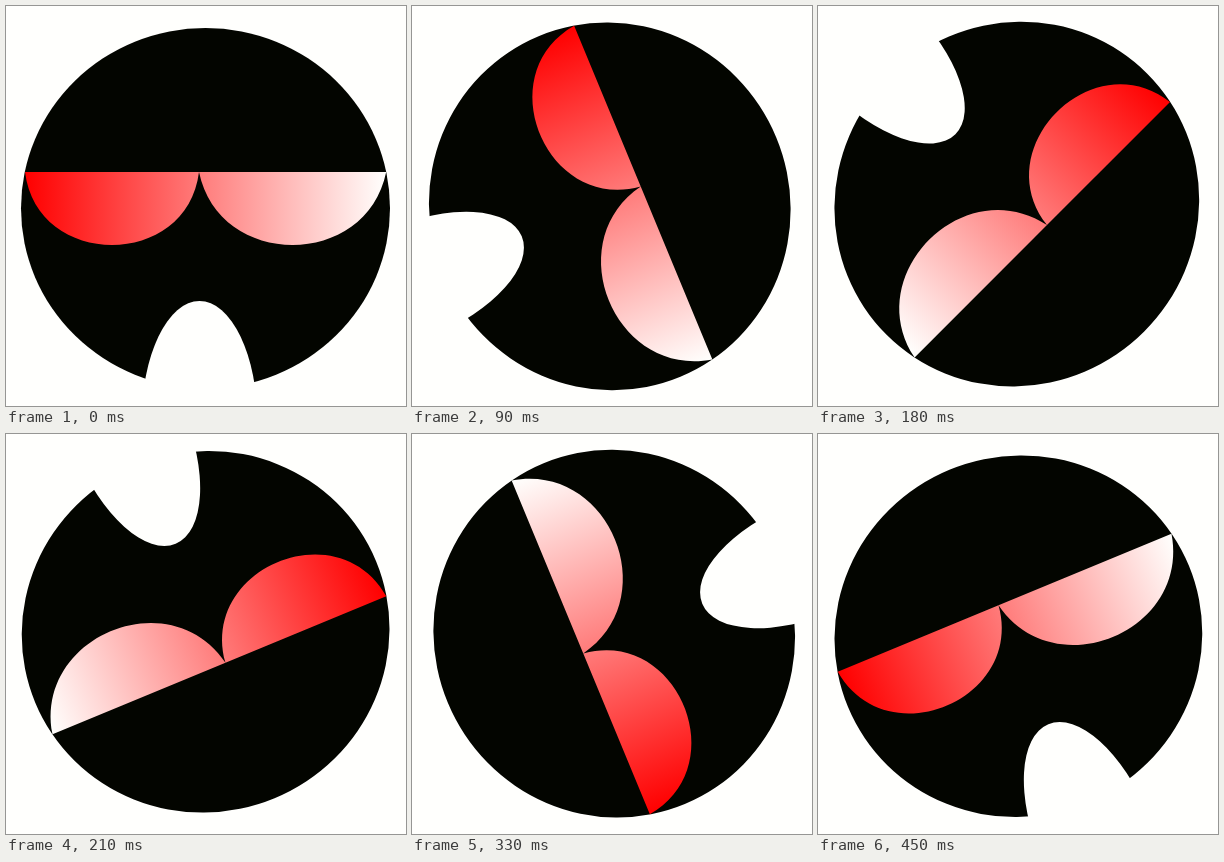
An HTML page that plays this animation: 400x400 px, repeating every 480 ms.

```html
<!DOCTYPE html>
<html lang="en">
<head>
<meta charset="utf-8">
<title>Spinning face</title>
<style>
  html, body { margin: 0; width: 100%; height: 100%; overflow: hidden; background: #fffffd; }
  svg { display: block; width: 100vw; height: 100vh; }
</style>
</head>
<body>
<svg viewBox="0 0 400 400">
  <defs>
    <linearGradient id="fade" gradientUnits="userSpaceOnUse" x1="19" y1="0" x2="380" y2="0">
      <stop offset="0" stop-color="#f00"/>
      <stop offset="1" stop-color="#fffffd"/>
    </linearGradient>
  </defs>
  <g id="face">
    <ellipse cx="199.5" cy="202.2" rx="184.5" ry="180.2" fill="#030500"/>
    <ellipse cx="193.5" cy="416" rx="58" ry="121" fill="#fffffd"/>
    <path id="eyes" fill="url(#fade)"/>
  </g>
</svg>
<script>
  const STEP = 30, STEPS = 16;
  const BROW = 166, DEPTH = 73;
  const face = document.getElementById('face');

  // A bowl hanging from the brow line; inset narrows its ends.
  function bowl(left, right, inset) {
    const low = BROW + DEPTH * 4 / 3;
    return `M${left} ${BROW}C${left + inset} ${low} ${right - inset} ${low} ${right} ${BROW}Z`;
  }

  document.getElementById('eyes').setAttribute('d', bowl(19, 193, 12) + bowl(193, 380.2, 20));

  function draw(ms) {
    const step = Math.floor(ms / STEP) % STEPS;
    face.setAttribute('transform', `rotate(${step * 360 / STEPS} 200 200)`);
  }

  const start = performance.now();
  function tick() {
    draw(performance.now() - start);
    requestAnimationFrame(tick);
  }
  tick();
</script>
</body>
</html>
```
